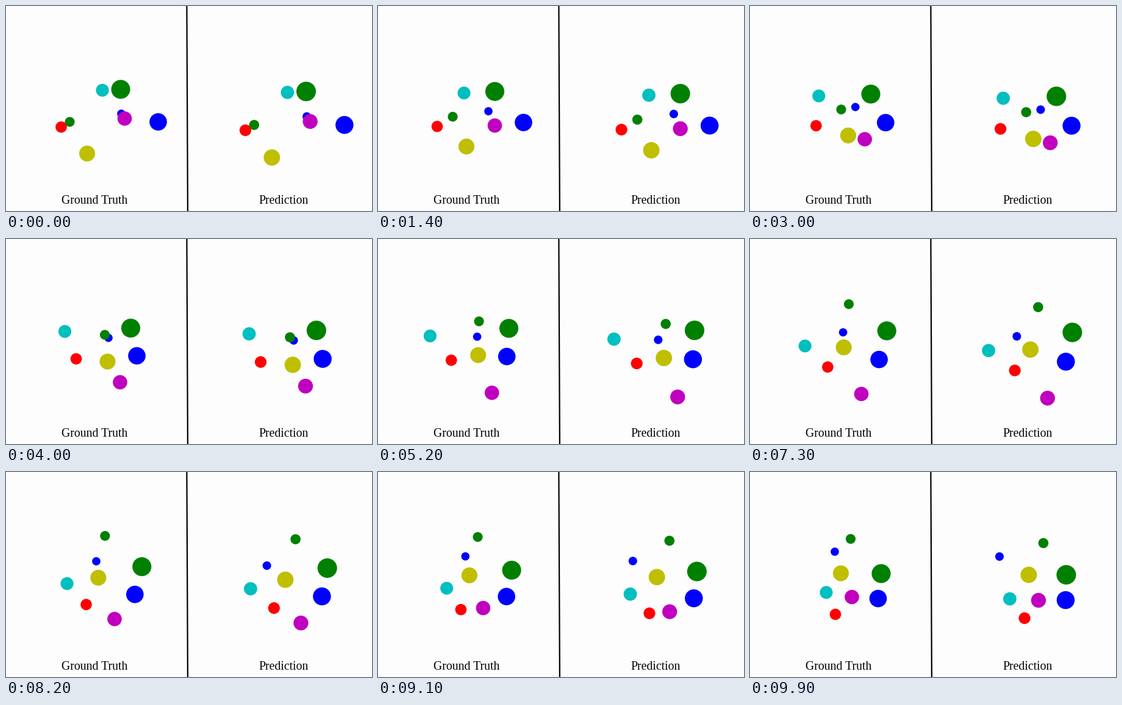
A matplotlib script that plays this animation: 600 px wide and 337 px high, repeating every 10 s.

```python
import numpy as np
import matplotlib.pyplot as plt
from matplotlib.animation import FuncAnimation
from matplotlib.patches import Circle

W, H, DPI = 600, 337, 100
FRAMES, INTERVAL = 100, 100
COLORS = "bgrcmy"
KNOTS = np.array([0, 1.4, 4, 6.4, 9.9])  # seconds
TIMES = np.arange(FRAMES) * INTERVAL / 1000
DRIFT_START = 4


def px(size):
    return size * 72 / DPI


def spline(points):
    """Natural cubic spline through points at KNOTS, sampled at TIMES."""
    y = np.asarray(points, float)
    h = np.diff(KNOTS)
    slope = np.diff(y, axis=0) / h[:, None]
    n = len(KNOTS)
    a, rhs = np.eye(n), np.zeros_like(y)
    for i in range(1, n - 1):
        a[i, i - 1:i + 2] = h[i - 1], 2 * (h[i - 1] + h[i]), h[i]
        rhs[i] = 6 * (slope[i] - slope[i - 1])
    m = np.linalg.solve(a, rhs)
    k = np.clip(np.searchsorted(KNOTS, TIMES, side="right") - 1, 0, n - 2)
    d, hk = (TIMES - KNOTS[k])[:, None], h[k][:, None]
    b = slope[k] - hk * (2 * m[k] + m[k + 1]) / 6
    return y[k] + d * (b + d * (m[k] / 2 + d * (m[k + 1] - m[k]) / (6 * hk)))


def predict(path, drift):
    """Same path, slightly enlarged in the right panel, with a growing error."""
    late = np.maximum(TIMES - DRIFT_START, 0)[:, None]
    return path * (1.0215, 1.029) + (300, -0.5) + late * np.array(drift)


fig = plt.figure(figsize=(W / DPI, H / DPI), dpi=DPI, facecolor="#fdfdfe")
ax = fig.add_axes([0, 0, 1, 1])
ax.set(xlim=(0, W), ylim=(H, 0))
ax.axis("off")

ax.plot([296.4, 297.9], [0, H], color="black", lw=px(2.2))
for x, label in ((145, "Ground Truth"), (455, "Prediction")):
    ax.text(x, 325, label, family="Liberation Serif", fontsize=px(19.8),
            ha="center", va="baseline", color="black")

balls = []


def add_ball(drift, *points):
    """Each new ball is larger than the last and lies on top of it."""
    i = len(balls) // 2
    path = spline(points)
    for track, scale in ((path, 1), (predict(path, drift), 1.03)):
        disc = Circle(track[0], (6.8 + 1.25 * i) * scale, lw=0,
                      color=COLORS[i % len(COLORS)], zorder=3 + i)
        balls.append((ax.add_patch(disc), track))


# drift in px/s, then the key points of the left panel
add_ball((-5.6, 0.8), (189, 177), (181, 173), (168, 162.5), (157, 158), (139, 131))
add_ball((2.1, 0.7), (104.5, 190.5), (122.5, 182), (162, 157.5), (163, 115), (165, 110))
add_ball((1.2, 0), (90.5, 199), (97, 198), (115, 197), (124, 204.5), (140, 234))
add_ball((-0.3, 0.9), (158, 138.5), (141, 143), (96.5, 152), (84.5, 168.5), (125, 198))
add_ball((0.4, 0), (194.5, 185), (191.5, 196.5), (187, 235.5), (185.5, 260), (167, 205.5))
add_ball((0.8, -0.3), (133, 242.5), (145, 231), (166.5, 201.5), (157.5, 183), (149, 166.5))
add_ball((0.5, -0.5), (249.5, 190.5), (238.5, 191.5), (214.5, 192), (211.5, 195.5), (210, 208))
add_ball((-0.2, -0.4), (188, 137), (191.5, 140.5), (204.5, 146.5), (222.5, 148), (215, 167))


def update(frame):
    for disc, track in balls:
        disc.center = track[frame]
    return [disc for disc, _ in balls]


anim = FuncAnimation(fig, update, frames=FRAMES, interval=INTERVAL,
                     repeat=True, repeat_delay=0, blit=False)
plt.show()
```
